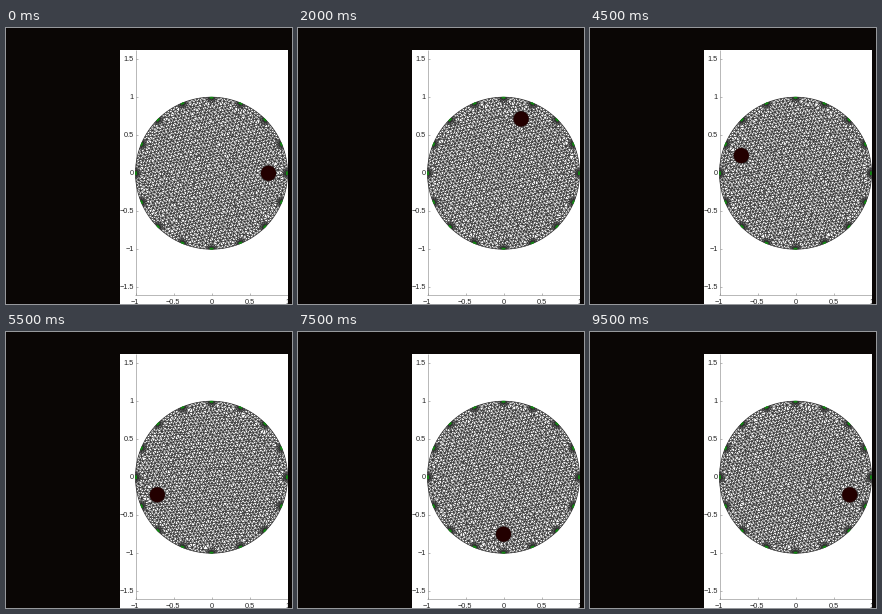
Animation, 286 px wide and 276 px high, one loop 10 s. Source, as a matplotlib script:

```python
import numpy as np
import matplotlib.pyplot as plt
from matplotlib.animation import FuncAnimation
from matplotlib.collections import LineCollection
from matplotlib.patches import Circle, Rectangle
from matplotlib.tri import Triangulation

W, H, DPI = 286, 276, 64
PX = 72 / DPI  # points per pixel
FRAMES, INTERVAL = 20, 500
CENTER, SCALE = np.array([205.5, 145.2]), 76
DARK, INK = "#0a0605", "#262626"
CELL, ORBIT, TARGET_R = 0.046, 0.75, 0.1
ELECTRODES = np.arange(16) * np.pi / 8
FAN_RADII = 0.019 * 1.5 ** np.arange(4)


def polar(radius, angle):
    return np.column_stack([radius * np.cos(angle), radius * np.sin(angle)])


def to_px(points):
    return CENTER + SCALE * np.asarray(points) * [1, -1]


def away_from(points, others, distance):
    gaps = np.linalg.norm(points[:, None] - others[None], axis=2)
    return points[gaps.min(axis=1) > distance]


def boundary_points():
    last = FAN_RADII[-1]
    side = np.concatenate([FAN_RADII, np.linspace(last, np.pi / 8 - last, 7)[1:-1]])
    offsets = np.concatenate([[0], side, -FAN_RADII])
    return polar(1, (ELECTRODES[:, None] + offsets).ravel())


def fan_points():
    """Rings of shrinking size that refine the mesh at each electrode."""
    fans = []
    for angle in ELECTRODES:
        for k, r in enumerate(FAN_RADII):
            turn = angle + np.pi + np.linspace(-1.1, 1.1, 5 + k % 2)
            fans.append(polar(1, np.array([angle])) + polar(r, turn))
    return np.concatenate(fans)


def lattice(rng):
    i, j = np.meshgrid(np.arange(-32, 33), np.arange(-32, 33))
    x = CELL * (i + 0.5 * (j % 2)).ravel()
    y = CELL * (j * np.sqrt(3) / 2).ravel()
    turn = rng.uniform(0.1, 0.25)
    grid = np.column_stack([x * np.cos(turn) - y * np.sin(turn),
                            x * np.sin(turn) + y * np.cos(turn)])
    grid += rng.normal(0, CELL * 0.12, grid.shape)
    return grid[np.hypot(*grid.T) < 0.93]


RIM = boundary_points()
FANS = fan_points()


def mesh_edges(n, target):
    rng = np.random.default_rng(100 + n)
    ring = polar(1 - 0.88 * CELL, np.linspace(0, 2 * np.pi, 130, endpoint=False))
    inner = np.concatenate([lattice(rng), ring])
    inner = away_from(inner, polar(1, ELECTRODES), FAN_RADII[-1] + 0.025)
    inner = away_from(inner, target[None], TARGET_R + 0.03)
    edge = target + polar(TARGET_R, np.linspace(0, 2 * np.pi, 20, endpoint=False))
    points = np.concatenate([RIM, FANS, inner, edge])
    mesh = Triangulation(*points.T)
    return to_px(points)[mesh.edges]


fig = plt.figure(figsize=(W / DPI, H / DPI), dpi=DPI, facecolor=DARK)
ax = fig.add_axes([0, 0, 1, 1])
ax.set(xlim=(0, W), ylim=(H, 0))
ax.axis("off")
ax.add_patch(Rectangle((114, 22), 168, 254, fc="white", lw=0))


def line(xs, ys, color=INK, width=0.6, z=2):
    ax.plot(xs, ys, color=color, lw=width * PX, zorder=z, solid_capstyle="butt")


def axis_line(xs, ys):
    line(xs, ys, color="#8c8c8c")


def label(x, y, value, ha):
    text = f"{value:g}".replace("-", "\u2212")
    ax.text(x, y, text, ha=ha, va="center", color=INK, zorder=2,
            family="Liberation Sans", size=7.4 * PX)


axis_line([129.5, 129.5], [22, 267])
axis_line([129, 282], [266.5, 266.5])
for value in np.arange(-1.5, 1.6, 0.5):
    y = to_px([0, value])[1]
    axis_line([129.5, 131.5], [y, y])
    label(127.5, y + 0.5, value, "right")
for value in np.arange(-1, 1.1, 0.5):
    x = to_px([value, 0])[0]
    axis_line([x, x], [264.5, 266.5])
    label(x - (1 if value < 0 else 0), 274, value, "center")

mesh = ax.add_collection(LineCollection([], colors="#2c2c2c", linewidths=0.75 * PX, zorder=3))
for angle in ELECTRODES:
    arc = to_px(polar(0.993, angle + np.linspace(-0.024, 0.024, 5)))
    line(*arc.T, color="#108a10", width=1.8, z=4)
target_disk = ax.add_patch(Circle((0, 0), TARGET_R * SCALE, fc="#230000", lw=0, zorder=5))
ax.add_patch(Rectangle((282, 0), 4, H, fc=DARK, lw=0, zorder=6))


def draw(n):
    target = polar(ORBIT, np.array([2 * np.pi * n / FRAMES]))[0]
    mesh.set_segments(mesh_edges(n, target))
    target_disk.center = tuple(to_px(target))
    return mesh, target_disk


anim = FuncAnimation(fig, draw, frames=FRAMES, interval=INTERVAL,
                     init_func=lambda: draw(0), repeat=True, repeat_delay=0)
plt.show()
```
